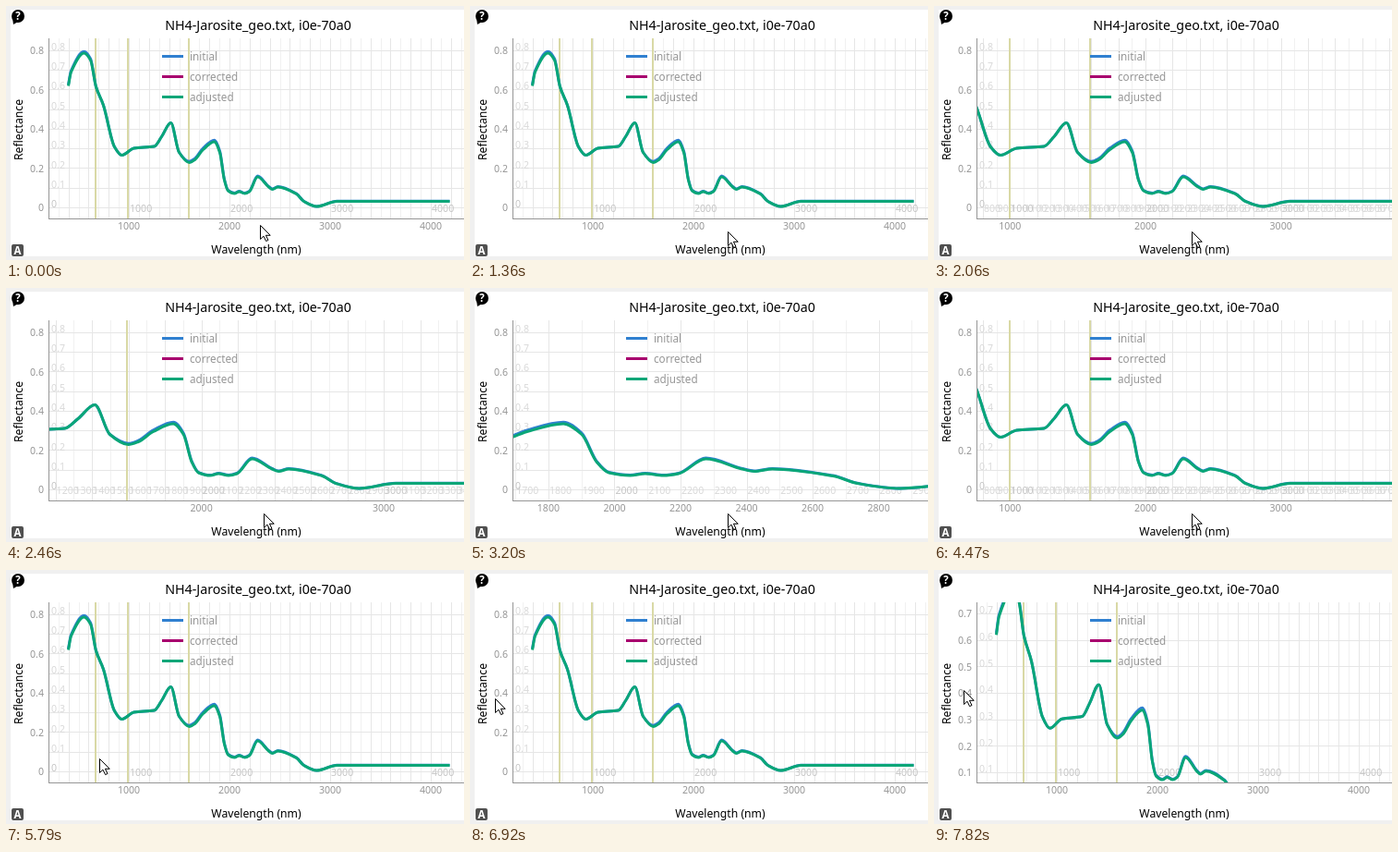
An HTML page that plays this animation: 496x275 px, repeating every 8 s.

```html
<!DOCTYPE html>
<html lang="en">
<head>
<meta charset="utf-8">
<title>Spectrum zoom</title>
<style>
  html, body { margin: 0; width: 100%; height: 100%; overflow: hidden; background: #f0f0f0; }
  svg { display: block; width: 100vw; height: 100vh; }
  text { font: 10.6px "Noto Sans", "Open Sans", sans-serif; fill: #969696; }
  .mid { text-anchor: middle; }
  .end { text-anchor: end; }
  .title { font-size: 14.25px; fill: #000; }
  .name { font-size: 12.2px; fill: #000; }
  .icon { font-size: 11.5px; font-weight: 700; fill: #fff; }
  .legend text { font-size: 11.7px; }
  .faint { fill: #d9d9d9; }
  .strong { fill: #c6c6c6; }
  .crisp { shape-rendering: crispEdges; }
  .curve { fill: none; stroke-width: 3; stroke-linejoin: round; }
</style>
</head>
<body>
<svg viewBox="0 0 496 275" preserveAspectRatio="none">
  <clipPath id="plot"><rect x="46" y="35" width="450" height="195"/></clipPath>
  <rect width="496" height="275" fill="#f0f0f0"/>
  <rect x="5" y="4" width="491" height="267" fill="#fff"/>
  <g id="chart"></g>
  <path class="crisp" d="M46.5 35V230.5H496" fill="none" stroke="#969696"/>
  <g class="legend" id="legend"></g>
  <text class="mid title" x="273" y="26">NH4-Jarosite_geo.txt, i0e-70a0</text>
  <text class="mid name" x="271" y="268">Wavelength (nm)</text>
  <text class="mid name" transform="translate(18 134) rotate(-90)">Reflectance</text>

  <circle cx="13" cy="11" r="7"/>
  <path d="M7 13L8 20L13 17Z"/>
  <text class="mid icon" x="13" y="15.2">?</text>
  <rect x="6" y="258" width="13" height="13" rx="2" fill="#505050"/>
  <text class="mid icon" x="12.5" y="268.6">A</text>

  <path id="cursor" d="M-.5 -.5V14.5L3 11.2L5.6 16.6L8 15.5L5.4 10.3H10.2Z" fill="#fff" stroke="#000"/>
</svg>
<script>
const LOOP = 8000;
const NOTCH = 1.02 ** 15;       // zoom factor of one wheel step
const ANCHOR_X = 279.5, ANCHOR_Y = 132.8;
const LEFT = 46, RIGHT = 496, TOP = 35, BOTTOM = 230;
const BLUE = "#3080d0", PURPLE = "#a8006e", GREEN = "#0aa678";

const zoomIn = [2060, 2460, 2880, 3200], zoomOut = [3770, 4190, 4470, 5000];
const zoomY = 7820;

// pointer turning points: [time, x, y]
const pointer = [[150,276,238], [630,286,250], [1110,285,238], [1230,281,236], [1350,280,245],
  [5310,280,245], [5790,102,205], [6150,28,141], [6270,28,132], [6510,25,149],
  [6750,30,128], [6990,26,151], [7230,32,122], [7470,33,131]];
const POINTER_STEP = 120, POINTER_PHASE = 30;

// turning points of the spectrum in unzoomed stage coordinates
const spectrum = [[67,86], [70,71], [84,50.5], [91,58], [97,87], [105,107], [117,152],
  [125,161], [138,153.5], [160,151.5], [168,141], [178,126], [187,158], [198,169],
  [204,166], [213,155], [225,146.5], [231,158], [236,188], [240,199.5], [247,202.5],
  [252,200.5], [258,202.5], [263,200.5], [272,184.5], [284,195.5], [288,198],
  [294,195.5], [314,203], [322,211], [336,216.5], [358,211], [480,211]];

const nmToBase = nm => 133 + (nm - 1000) * 0.109;
const reflToBase = r => 218.5 - r * 213;

// monotone cubic through the points, so it never overshoots a turning point
function smoothPath(p) {
  const slope = i => (p[i + 1][1] - p[i][1]) / (p[i + 1][0] - p[i][0]);
  const tangent = i => {
    if (i === 0) return slope(0);
    if (i === p.length - 1) return slope(i - 1);
    const a = slope(i - 1), b = slope(i);
    return a * b <= 0 ? 0 : 2 * a * b / (a + b);
  };
  return p.slice(1).reduce((d, [x, y], i) => {
    const [x0, y0] = p[i], third = (x - x0) / 3;
    const ctrl = [x0 + third, y0 + tangent(i) * third, x - third, y - tangent(i + 1) * third, x, y];
    return d + "C" + ctrl.map(v => v.toFixed(2)).join(" ");
  }, "M" + p[0]);
}

const label = (cls, x, y, s) => `<text class="${cls}" x="${x.toFixed(1)}" y="${y.toFixed(1)}">${s}</text>`;
const rule = (d, color) => `<path class="crisp" d="${d}" stroke="${color}"/>`;

function drawChart(xSteps, ySteps) {
  const kx = NOTCH ** xSteps, ky = NOTCH ** ySteps;
  const mapX = x => ANCHOR_X + (x - ANCHOR_X) * kx;
  const mapY = y => ANCHOR_Y + (y - ANCHOR_Y) * ky;
  // the uncorrected detectors differ in gain
  const gain = x => x < 97 ? 1.01 : x >= 198 ? 1.026 : 1;
  const curve = (color, gainAt) => {
    const pts = spectrum.map(([x, y]) => [mapX(x) + 0.5, mapY(218.5 + (y - 218.5) * gainAt(x)) + 0.5]);
    return `<path class="curve" stroke="${color}" d="${smoothPath(pts)}"/>`;
  };
  let grid = "", inner = "", outer = "", bands = "";

  for (let nm = 100; nm <= 4400; nm += 100) {
    const x = mapX(nmToBase(nm)), major = nm % 1000 === 0, px = Math.round(x) + 0.5;
    if (x < LEFT || x > RIGHT) continue;
    grid += rule(`M${px} ${TOP}V${BOTTOM}`, nm % 200 ? "#f1f1f1" : "#e6e6e6");
    if (major || xSteps) inner += label(major ? "strong" : "faint", x + 1, 223, nm);
    if (major || (xSteps > 2 && nm % 200 === 0)) outer += label("mid", x, 242, nm);
  }
  for (let i = 0; i <= 9; i++) {
    const y = mapY(reflToBase(i / 10)), py = Math.floor(y) + 0.5;
    if (y < TOP || y > BOTTOM) continue;
    const text = i ? (i / 10).toFixed(1) : "0";
    grid += rule(`M${LEFT} ${py}H${RIGHT}`, "#e6e6e6");
    inner += label(i ? "faint" : "strong", 49, y - 0.3, text);
    if (ySteps || i % 2 === 0) outer += label("end", 41, y + 3.8, text);
  }
  for (const nm of [670, 995, 1592]) {
    const x = Math.round(mapX(nmToBase(nm))) - 1;
    bands += `<rect x="${x}" y="${TOP}" width="2" height="195" fill="#d9d9a6"/>`;
  }
  document.getElementById("chart").innerHTML =
    `<g clip-path="url(#plot)">${grid}${inner}${bands}` +
    `${curve(BLUE, gain)}${curve(GREEN, () => 1)}</g>${outer}`;
}

document.getElementById("legend").innerHTML =
  [["initial", BLUE], ["corrected", PURPLE], ["adjusted", GREEN]].map(([name, color], i) =>
    `<rect class="crisp" x="169" y="${53 + i * 22}" width="23" height="3" fill="${color}"/>` +
    label("", 199, 59 + i * 22, name)).join("");

function pointerAt(time) {
  const t = Math.floor((time - POINTER_PHASE) / POINTER_STEP) * POINTER_STEP + POINTER_PHASE;
  const next = pointer.findIndex(p => p[0] > t);
  if (next === 0) return pointer[0].slice(1);
  if (next < 0) return pointer.at(-1).slice(1);
  const [t0, x0, y0] = pointer[next - 1], [t1, x1, y1] = pointer[next];
  const k = (t - t0) / (t1 - t0);
  return [x0 + (x1 - x0) * k, y0 + (y1 - y0) * k].map(Math.round);
}

const cursor = document.getElementById("cursor");
const countBefore = (times, t) => times.filter(s => s <= t).length;
let shown;

function tick(now) {
  const t = now % LOOP;
  const xSteps = countBefore(zoomIn, t) - countBefore(zoomOut, t);
  const ySteps = t >= zoomY ? 1 : 0;
  const view = `${xSteps},${ySteps}`;
  if (view !== shown) drawChart(xSteps, ySteps);
  shown = view;
  cursor.setAttribute("transform", `translate(${pointerAt(t)})`);
  requestAnimationFrame(tick);
}
tick(performance.now());
</script>
</body>
</html>
```
